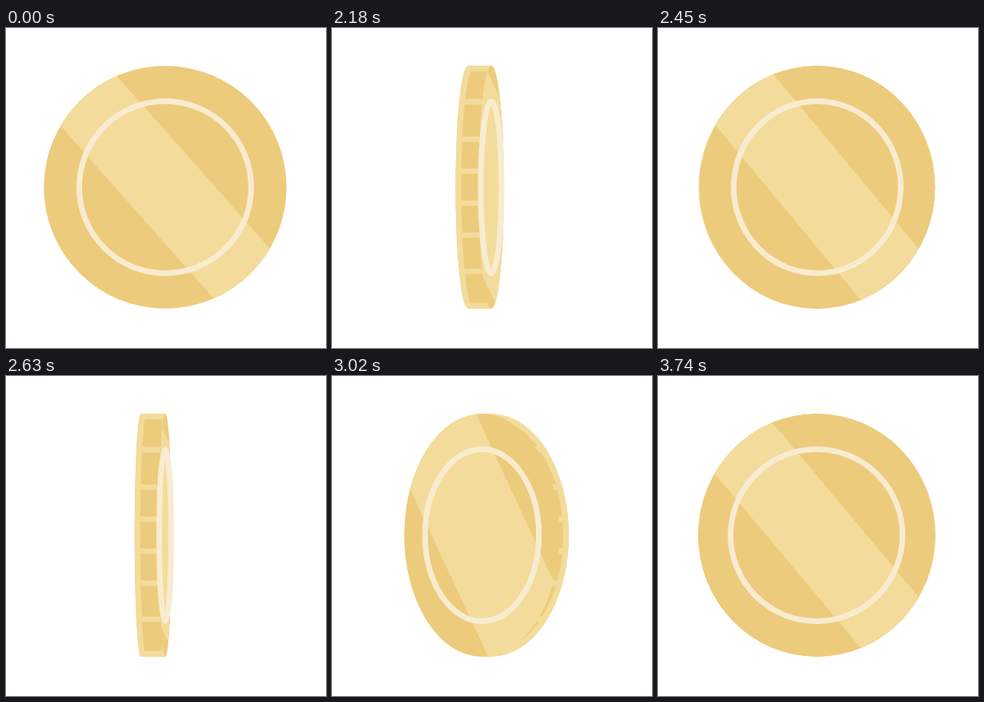
Animation of 400 by 400 pixels, one loop 3.83 s. Source, as an HTML page with a canvas:

```html
<!DOCTYPE html>
<html>
<head>
<meta charset="utf-8">
<title>Spinning coin</title>
<style>
  html, body { margin: 0; width: 100%; height: 100%; overflow: hidden; background: #fff; }
  canvas { display: block; }
</style>
</head>
<body>
<canvas id="stage" width="400" height="400"></canvas>
<script>
const ctx = document.getElementById("stage").getContext("2d");
const GOLD = "#edcb7c", LIGHT = "#f3dc9b", CREAM = "#f8ecd0";
const CX = 199, CY = 199, RADIUS = 151.7, RING = 107.5, LINE = 7, DEPTH = 32;
const RIDGES = [92, 139, 179, 219, 259, 304];
const LOOP = 3830, START = 2030, STEP = 30, LAST = 57;
const EDGE_ON = 2637, SETTLED = 3740, FINAL = 0.975;

// Openness of the face (0 edge-on, 1 frontal) and which way it leans.
function poseAt(time) {
  if (time < START) return { open: 1, ring: 1, side: 0 };
  const t = START + STEP * Math.min(LAST, Math.floor((time - START) / STEP));
  if (t < EDGE_ON) {
    const angle = (23 + 0.4067 * (t - START)) * Math.PI / 180;
    const open = Math.abs(Math.cos(angle));
    return { open, ring: open, side: Math.tan(angle) > 0 ? 1 : -1 };
  }
  const u = Math.min(1, (t - EDGE_ON) / (SETTLED - EDGE_ON));
  const ring = 1 - Math.pow(1 - u, 2.5);
  return { open: FINAL * ring, ring, side: -1 };
}

function ellipse(x, rx, ry) {
  ctx.beginPath();
  ctx.ellipse(x, CY, rx, ry, 0, 0, Math.PI * 2);
}

function drawRim(left, right, rx) {
  const q = Math.PI / 2;
  ctx.save();
  ctx.beginPath();
  ctx.ellipse(left, CY, rx, RADIUS, 0, q, 3 * q);
  ctx.ellipse(right, CY, rx, RADIUS, 0, -q, q);
  ctx.closePath();
  ctx.fillStyle = GOLD;
  ctx.fill();
  ctx.clip();
  ctx.strokeStyle = LIGHT;
  ctx.lineWidth = LINE * 2;
  ctx.stroke();
  ctx.fillStyle = LIGHT;
  for (const y of RIDGES) ctx.fillRect(0, y - LINE / 2, 400, LINE);
  ctx.restore();
}

function drawFace(x, rx, open) {
  ctx.save();
  ellipse(x, rx, RADIUS);
  ctx.fillStyle = GOLD;
  ctx.fill();
  ctx.clip();
  // The shine steepens as the face narrows.
  const shut = 1 - open;
  const tilt = 41.6 - 65 * shut + 52 * shut * shut;
  const lean = 200 * Math.tan(tilt * Math.PI / 180);
  const half = 62.8;
  ctx.beginPath();
  ctx.moveTo(x - lean - half, CY - 200);
  ctx.lineTo(x - lean + half, CY - 200);
  ctx.lineTo(x + lean + half, CY + 200);
  ctx.lineTo(x + lean - half, CY + 200);
  ctx.fillStyle = LIGHT;
  ctx.fill();
  ctx.restore();
}

function draw(time) {
  const { open, ring, side } = poseAt(time);
  const rx = RADIUS * open;
  const shift = CX - DEPTH * (1 - open);
  const front = side < 0 ? shift : CX;
  ctx.fillStyle = "#fff";
  ctx.fillRect(0, 0, 400, 400);
  if (side) drawRim(shift, CX, rx);
  drawFace(front, rx, open);
  ellipse(front, RING * ring + 2 * (1 - ring), RING);
  ctx.strokeStyle = CREAM;
  ctx.lineWidth = LINE;
  ctx.stroke();
}

const origin = performance.now();
function tick() {
  draw((performance.now() - origin) % LOOP);
  requestAnimationFrame(tick);
}
tick();
</script>
</body>
</html>
```
